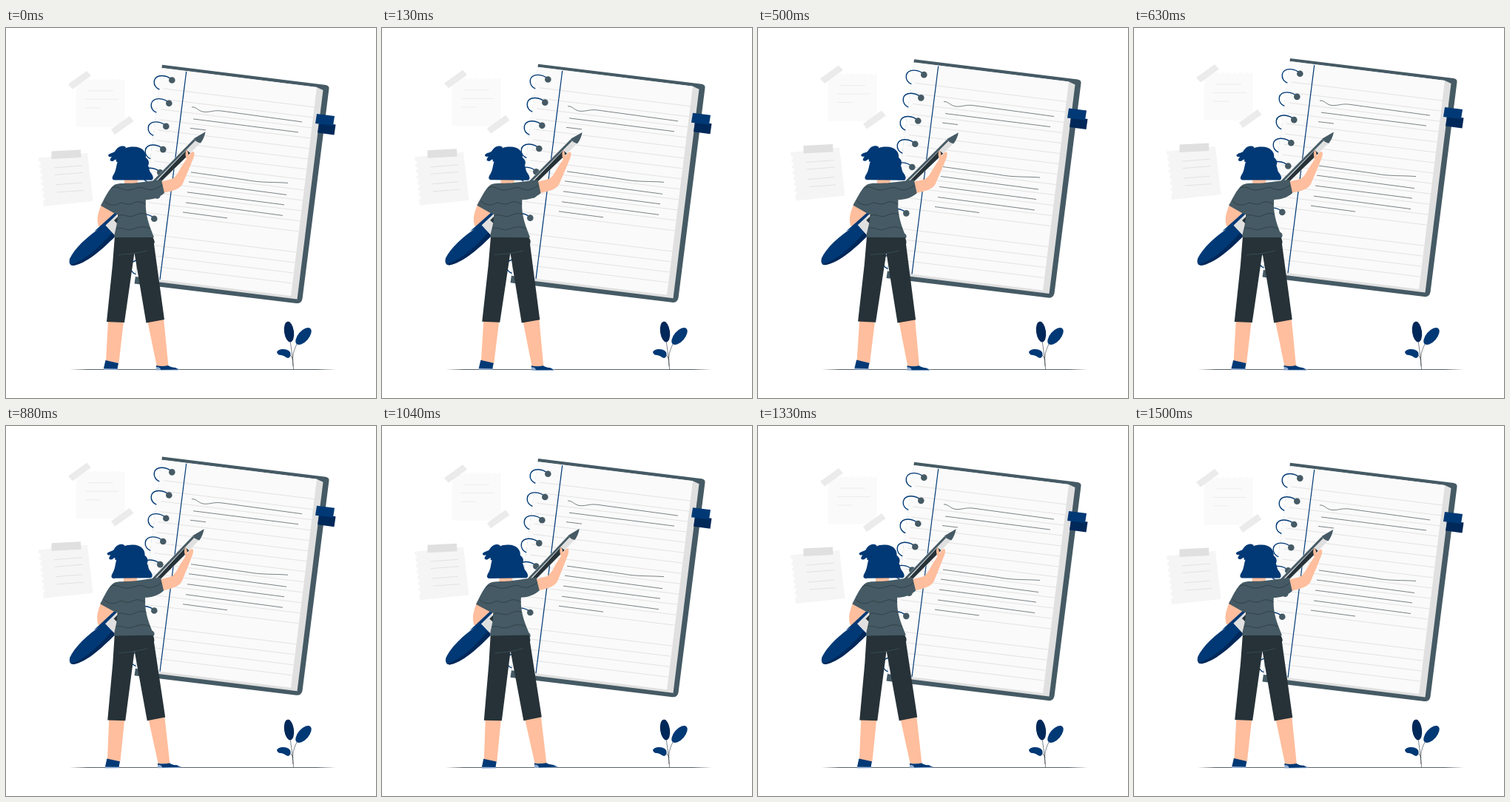
An HTML page that plays this animation: 500 by 500 pixels, repeating every 1540 ms.

```html
<!DOCTYPE html>
<html lang="en">
<head>
<meta charset="utf-8">
<title>Writing in a notebook</title>
<style>
html, body { margin: 0; height: 100%; overflow: hidden; background: #fff; }
svg { display: block; width: 100%; height: 100%; }
.navy { fill: #003975; }
.deep { fill: #002859; }
.slate { fill: #455a64; }
.dark { fill: #263238; }
.skin { fill: #ffbe9d; }
.pale { fill: #e0e0e0; }
.tape { fill: #ebebeb; }
.line { fill: none; stroke: #e0e0e0; stroke-width: .9; }
.faint { stroke: #ebebeb; }
.ink { fill: none; stroke: #263238; stroke-width: .6; }
.ring { fill: none; stroke: #003975; stroke-width: 1.4; }
.torn { fill: none; stroke: #fff; stroke-width: 4.5; stroke-linecap: round; stroke-dasharray: 0 8; }
</style>
</head>
<body>
<svg viewBox="0 0 500 500">
  <g id="floating">
    <g id="notes">
      <path fill="#fafafa" d="M95 69H160.5V133.500H95Z"/>
      <path class="torn" d="M108 68.500H160"/>
      <path class="line faint" d="M111 85H145M107 96.500H152M107 108H128"/>
      <path class="tape" d="M84 76L109 58 115 64.500 90 82.500ZM142 137L167 119 172.500 126 147 144Z"/>
      <path fill="#f5f5f5" d="M44 175.500L110 169 117.500 234 51 241Z"/>
      <path class="torn" d="M45 183L51 238"/>
      <path class="line" d="M65 189L103 186M66 198.500L104 195.500M67 212L103 209M69 222L105 219.500"/>
      <path class="pale" d="M61.500 166.500L101 164.500 101.500 175 61.500 177Z"/>
    </g>
    <path class="slate" d="M211 49.800L432 77Q437 78 436.500 82L400.500 366Q399 373 392 372L173.500 345.500 175 335Z"/>
    <path class="pale" d="M212 54L420 80 428.500 84 393.500 366.500 180 340Z"/>
    <path fill="#fafafa" d="M210 54L420 80 385 362 175 336Z"/>
    <g id="rules" class="line"></g>
    <path class="ring" style="stroke-width:1.200" d="M243.700 59L208 340"/>
    <path class="ink" d="M251 107C257 106 260 113 268 113.500C276 114 280 111 290 112L400 127
      M253 123L395 141M249 135.500L270 138
      M250 195L325 205.500C345 209.500 362 208 381 209.500
      M247 208L379 225.500M245 222L376 239M243 236L374 253.500M239 249L299 257"/>
    <g id="rings"></g>
    <path class="deep" d="M423 128L445.500 130.500 443.500 144.500 421 141.500Z"/>
    <path class="navy" d="M420 116L444 119 442 132 418 129Z"/>
  </g>

  <path d="M86 461.400L110 461.100H420L447 461.400 420 461.700H110Z" class="dark"/>
  <g id="plant">
    <path class="ink" d="M388.500 461C388 448 386 438 384 422M388 457C386 445 389 433 395 424M382 441Q387 443 388 449"/>
    <ellipse class="deep" cx="382.500" cy="410.500" rx="6.500" ry="14" transform="rotate(-8 382.500 410.500)"/>
    <ellipse class="navy" cx="402" cy="416.500" rx="7.200" ry="14" transform="rotate(41 402 416.500)"/>
    <path class="navy" d="M366 438C368 433 378 433 382 436C386 439 385 444 382 446C378 446 376 442 371 442Q367 442 366 438Z"/>
  </g>

  <g id="writer">
    <path class="skin" d="M130 236C124 250 122 258 125 268L138 270 152 250 148 236Z"/>
    <g id="pen">
      <path class="navy" d="M86 312C92 299 108 282 134 266L148 281C127 302 108 318 91 321Q84 321 86 312Z"/>
      <path class="deep" d="M87 320C105 315 125 298 143 277L148 281C127 302 108 318 91 321Z"/>
      <path class="pale" d="M134 266L149 252 157 272 148 281Z"/>
      <path class="dark" d="M146 260L152 254 156 259 150 264Z"/>
      <path class="navy" d="M119 275L149 248 151 251 132 269Z"/>
      <path class="pale" d="M199 206L254 149 263 155 207 211Z"/>
      <path class="dark" d="M202 209L244 165 249 169 207 210Z"/>
      <path class="slate" d="M198 207L254 150 256 152 201 208ZM269.500 140.300L254 149.300Q257 154.500 263 155.500Q268 149 269.500 140.300Z"/>
    </g>
    <path class="skin" d="M208 208L224 204C229 202 233 195 236 189L244 177C242 172 242 166 244.500 165C246.500 168 246 171 247 173C250 167 254 165 254.500 169C255 174 252 178 250 184L239 210C236 217 227 220 212 223Z"/>
    <path class="skin" d="M138 396L159 396 152.500 453 135 451ZM191 395L213 392 219.500 457 204 458Z"/>
    <path fill="#8fa9cc" d="M132 459H151V462H132ZM203 457H219L235 461 233 462.500H203Z"/>
    <path class="navy" d="M134.500 449L152 453 150.500 460.500 132 460ZM203 456Q211 458 219 456Q223 459 229 459L233 461.500 209 462Q209 458 203 458Z"/>
    <path class="dark" d="M147 281L198 282Q201.500 288 200 292L214 394 189.500 398.500 173.500 304 160 398 136 397 144 320Z"/>
    <path class="ink" style="stroke:#455a64" d="M152 306.500Q172 306 191 301"/>
    <path class="skin" d="M160 203H178V214H160Z"/>
    <path class="slate" d="M149 211C155 209 167 210.500 178 209L210 205 214 223C206 230 197 232 189 232C188 245 190 256 195 270L200 283H146C147 274 151 265 151 252L147.500 251 128 240C134 229 141 213 149 211Z"/>
    <path class="ink" d="M142 217C150 211 156 220 166 219S180 213 188 217S205 217 211 212
      M133 234C140 241 148 240 153 237S163 241 171 237S181 235 189 238
      M151 254C159 250 165 257 172 254S183 249 190 252
      M149 271C156 268 163 275 171 272S185 267 195 271"/>
    <g id="hair" class="navy">
      <path d="M172 160.500C183 160 190 167 189 175C193 178 194 182 192 186C194 189 193 193 196 196C199 200 200 204 197 205.500H149C143 206 142 203 146 197C149 192 149 185 151 180C150 175 153 166 160 163C164 161 168 160.500 172 160.500Z"/>
      <path d="M162 161C155 157 150 162 147 167C144 169 140 169 138 172C139 175 141 174 143 174C140 177 140 180 143 180C145 181 147 177 149 178C148 181 150 182 152 180C156 177 158 171 160 168Z"/>
    </g>
  </g>
</svg>
<script>
const LOOP = 1540, LEAD = 48, LIFT = 4.6, SWAY = 0.88;
const get = id => document.getElementById(id);
const repeat = (n, draw) => Array.from({ length: n }, (_, i) => draw(i)).join('');

get('rules').innerHTML = repeat(18, i => i === 13 ? '' :
  `<path d="M${213 - 1.8 * i} ${82 + 14 * i}l204 25"/>`);

get('rings').innerHTML = repeat(9, i => `<g transform="translate(${224.3 - 4 * i} ${70.6 + 31.2 * i})">
  <path class="ring" d="M0 0C-6 -7.500 -22 -9 -24 1C-25 7 -21 11 -17 12.500"/><circle class="slate" r="4.300"/></g>`);

const floating = get('floating'), writer = get('writer');
const phase = ms => (ms + LEAD) / LOOP * 2 * Math.PI;

function frame() {
  const p = phase(performance.now() % LOOP);
  floating.setAttribute('transform', `translate(0 ${LIFT * (Math.cos(p) - 1)})`);
  writer.setAttribute('transform', `rotate(${SWAY * (Math.sin(p) - Math.sin(phase(0)))} 177 295)`);
  requestAnimationFrame(frame);
}
frame();
</script>
</body>
</html>
```
